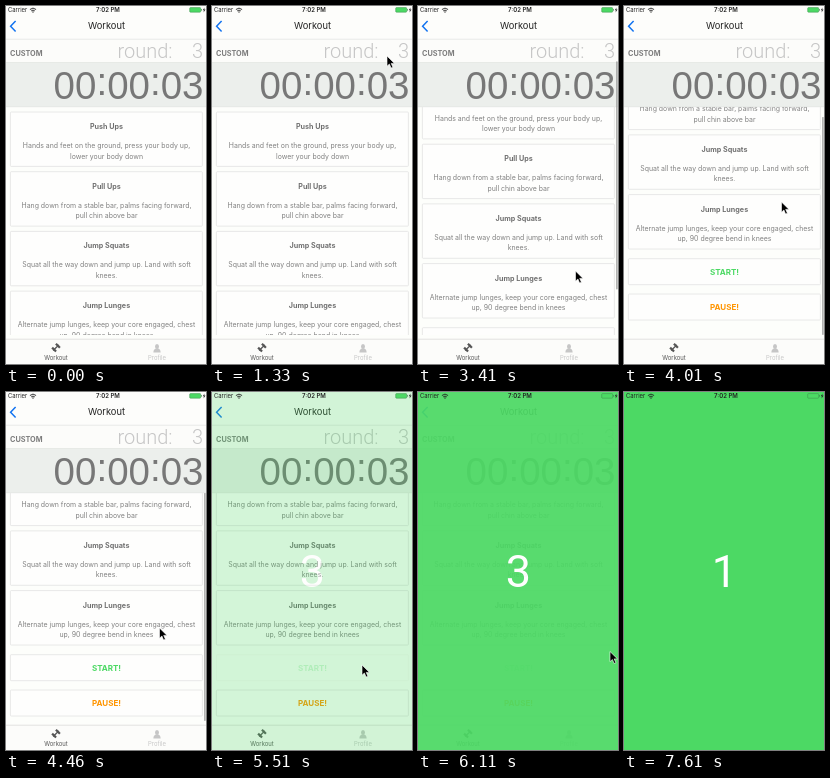
Animation of 200 by 358 pixels, one loop 8000 ms. Source, as an HTML page:

```html
<!DOCTYPE html>
<html lang="en">
<head>
<meta charset="utf-8">
<title>Workout timer</title>
<style>
html, body { margin: 0; width: 100%; height: 100%; overflow: hidden; background: #fff; }
svg { display: block; width: 100%; height: 100%; }
text { font: 400 6.95px Inter, "Open Sans", sans-serif; white-space: pre; }
.mid { text-anchor: middle; }
.end { text-anchor: end; }
.bold { font-weight: 700; }
.thin { font-family: Roboto, "Liberation Sans", sans-serif; font-weight: 300; }
.clock { font: 38.5px "Liberation Sans", Arial, sans-serif; }
.card { fill: #fefefd; stroke: #e2e2e2; stroke-width: .8; }
.tab { font-size: 5.9px; }
</style>
</head>
<body>
<svg viewBox="0 0 200 358">
  <defs><clipPath id="view"><rect y="101" width="200" height="228"/></clipPath></defs>
  <rect width="200" height="358" fill="#fdfefb"/>

  <g id="list-view" clip-path="url(#view)"><g id="list"></g></g>

  <rect width="200" height="33" fill="#fdfdfb"/>
  <path d="M0 33.3H200" stroke="#c8c8c8" stroke-width=".6"/>
  <path d="M9.6 15L4.6 20.2L9.6 25.4" fill="none" stroke="#1273f0" stroke-width="1.5"/>
  <text class="mid" x="100.5" y="23.4" style="font-size:9.3px" fill="#222">Workout</text>

  <rect y="33.6" width="200" height="23" fill="#fcfcfa"/>
  <text class="bold" x="4" y="50.3" style="font-size:7.3px" fill="#7d7d7d">CUSTOM</text>
  <text class="thin" x="111.5" y="52" style="font-size:20px" fill="#c6c6c6">round:</text>
  <text class="thin end" x="197" y="52" style="font-size:20px" fill="#c6c6c6">3</text>
  <rect y="56.5" width="200" height="44.5" fill="#ecefec"/>
  <path d="M0 56.5H200M0 100.8H200" stroke="#e0e2e0" stroke-width=".6"/>
  <text class="clock end" x="197.5" y="93" fill="#777">00<tspan dy="-4">:</tspan><tspan dy="4">00</tspan><tspan dy="-4">:</tspan><tspan dy="4">03</tspan></text>

  <rect id="bar" x="198.2" width="1.4" rx=".7" fill="#a0a0a0"/>

  <rect y="333" width="200" height="25" fill="#fcfcfa"/>
  <path d="M0 333.2H200" stroke="#d0d0d0" stroke-width=".6"/>
  <g transform="translate(50 341.7) rotate(-45)" fill="#555">
    <rect x="-4" y="-.7" width="8" height="1.4"/>
    <rect x="-3.8" y="-2.8" width="2.2" height="5.6"/>
    <rect x="1.6" y="-2.8" width="2.2" height="5.6"/>
  </g>
  <text class="mid tab" x="50" y="354" fill="#555">Workout</text>
  <g fill="#c6c6c6">
    <ellipse cx="151" cy="340.4" rx="2" ry="2.5"/>
    <path d="M147.4 346.4q0 -3.6 3.6 -3.8t3.6 3.8z"/>
    <text class="mid tab" x="151" y="354">Profile</text>
  </g>

  <g id="cover">
    <rect width="200" height="358" fill="#4cd964"/>
    <text id="count" class="thin mid" x="100.3" y="194.5" style="font-size:45px;font-weight:400" fill="#fff"></text>
  </g>

  <g fill="#222">
    <text x="2" y="6" style="font-size:5.9px">Carrier</text>
    <path d="M23.9 3.5q3.1 -2.8 6.2 0M25.2 4.9q1.8 -1.6 3.6 0" fill="none" stroke="#222" stroke-width=".9"/>
    <circle cx="27" cy="6" r=".7"/>
    <text class="mid" x="102" y="6" style="font-size:6px;font-weight:600">7:02 PM</text>
    <rect x="183.7" y="1.6" width="11" height="4.6" rx=".8" fill="#4cd964" stroke="#3b8a4a" stroke-width=".5"/>
    <path d="M195.3 3v1.8h.7v-1.8z" fill="#3b8a4a"/>
    <path d="M198.5 1.6l-1.7 2.6h1.2l-.5 2.2l2 -2.9h-1.3z"/>
  </g>

  <path id="cursor" d="M0 0V10.2L2.4 8L4.1 12L5.9 11.2L4.2 7.4H7.5Z" fill="#000" stroke="#fff" stroke-width=".6"/>
</svg>

<script>
const LOOP = 8000, STEP = 150, PHASE = 110, MAX_SCROLL = 86.5;
const TRACK_TOP = 34, TRACK = 295;   // the scroll bar also runs beside the header
const $ = id => document.getElementById(id);

const moves = [
  ["Push Ups", "Hands and feet on the ground, press your body up,", "lower your body down"],
  ["Pull Ups", "Hang down from a stable bar, palms facing forward,", "pull chin above bar"],
  ["Jump Squats", "Squat all the way down and jump up. Land with soft", "knees."],
  ["Jump Lunges", "Alternate jump lunges, keep your core engaged, chest", "up, 90 degree bend in knees"]
];
const box = (y, h) => `<rect class="card" x="4.4" y="${y}" width="192" height="${h}" rx=".8"/>`;
const line = (s, y, style = "") => `<text class="mid" x="100.5" y="${y}" fill="#808080" style="${style}">${s}</text>`;
const button = (id, s, y, color) =>
  `<g id="${id}">${box(y, 26)}${line(s, y + 16, `font-size:8px;font-weight:700;fill:${color}`)}</g>`;

$("list").innerHTML = moves.map(([name, a, b], i) => {
  const y = 106 + i * 59.7;
  return box(y, 54.4) + line(name, y + 17, "font-size:7.2px;font-weight:700;fill:#707070") +
    line(a, y + 36) + line(b, y + 46.5);
}).join("") + button("start", "START!", 349.2, "#4cd964") + button("pause", "PAUSE!", 384.5, "#ff9500");

// Pointer path: time, x, y
const path = [
  [740, 196, 42], [1010, 176, 27], [1310, 175, 50], [1770, 173, 121],
  [2510, 162, 307], [2990, 162, 307], [3110, 161, 299], [3410, 157.5, 265],
  [4010, 157.5, 196], [4160, 157.5, 196], [4310, 157, 208], [4460, 153.5, 236],
  [4760, 151, 267], [4910, 150, 273], [5660, 150, 273], [6260, 206, 255]
];

const clamp = v => Math.min(1, Math.max(0, v));

function pointer(t) {
  const i = path.findIndex(p => p[0] > t);
  if (i < 0) return path[path.length - 1].slice(1);
  if (!i) return path[0].slice(1);
  const a = path[i - 1], b = path[i], u = (t - a[0]) / (b[0] - a[0]);
  return [1, 2].map(k => a[k] + (b[k] - a[k]) * u);
}

// Dragging follows the pointer, then the overscroll springs back.
function scrollAt(t) {
  if (t < 2990) return 0;
  if (t <= 4010) return Math.max(0, 292.5 - pointer(t)[1]);
  return MAX_SCROLL + 10 * (1 - clamp((t - 4010) / 450)) ** 3;
}

function draw(now) {
  const time = now % LOOP;
  const t = Math.floor((time - PHASE) / STEP) * STEP + PHASE;
  const [x, y] = pointer(t), scroll = scrollAt(t);

  $("list").setAttribute("transform", `translate(0 ${-scroll})`);
  const ratio = TRACK / (TRACK + MAX_SCROLL);
  const over = Math.max(0, scroll - MAX_SCROLL);
  $("bar").setAttribute("y", TRACK_TOP + (scroll - over) * ratio + over);
  $("bar").setAttribute("height", TRACK * ratio - over);
  $("bar").setAttribute("opacity", t < 3110 ? 0 : 1 - clamp((t - 4460) / 450));

  $("start").setAttribute("opacity", t >= 5510 ? .25 : 1);
  $("cover").setAttribute("opacity", 1 - (1 - clamp((t - 5360) / 900)) ** 1.47);
  $("count").textContent = time < 6560 ? 3 : time < 7610 ? 2 : 1;

  $("cursor").setAttribute("transform", `translate(${x} ${y})`);
  $("cursor").setAttribute("visibility", time >= 740 && t < 6260 ? "visible" : "hidden");
}

const begin = performance.now();
function frame() {
  draw(performance.now() - begin);
  requestAnimationFrame(frame);
}
frame();
</script>
</body>
</html>
```
